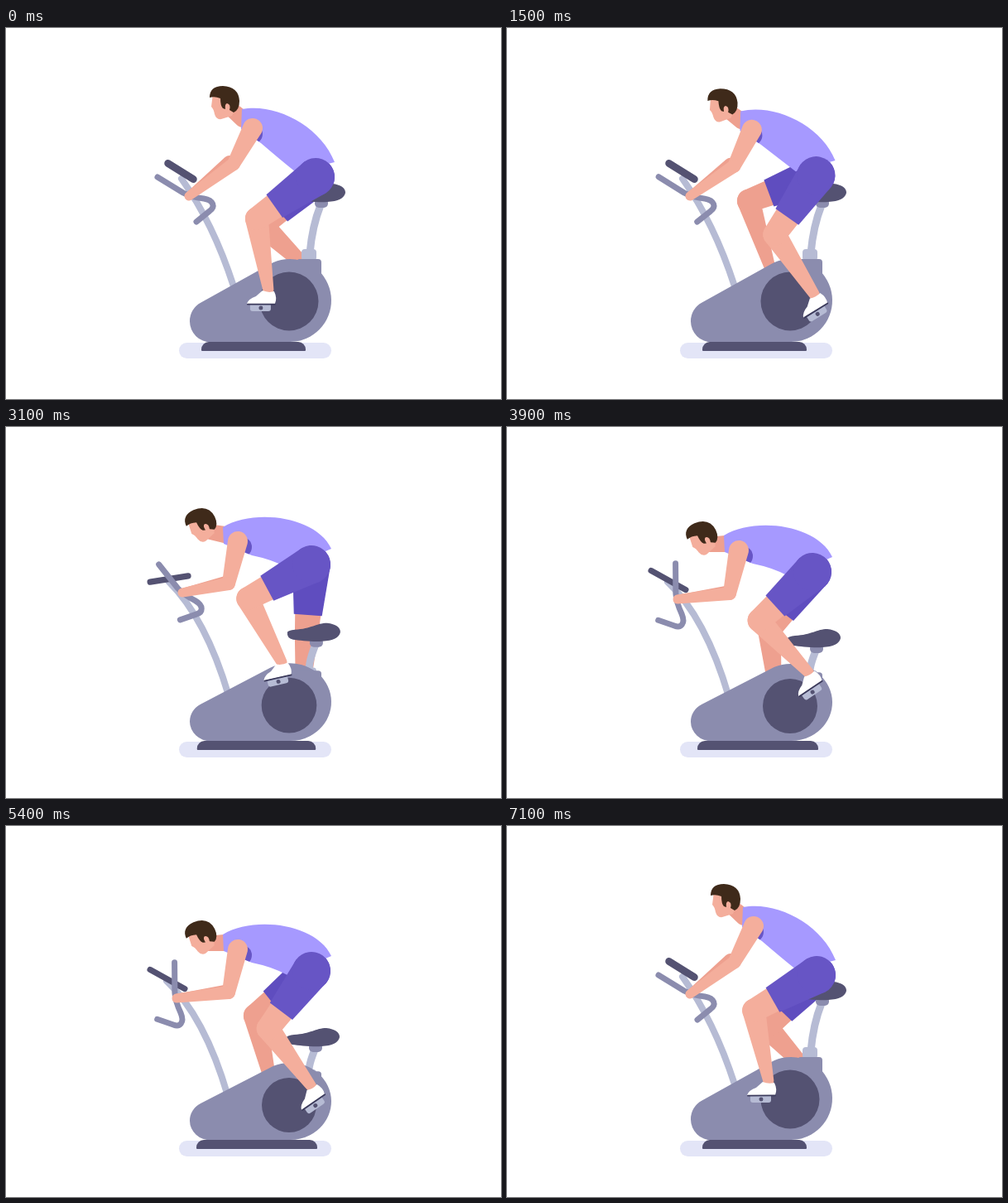
Recreate the animation shown at these times as an HTML page with a canvas. Size 598 by 448 pixels, loop 7.2 s.

```html
<!DOCTYPE html>
<html>
<head>
<meta charset="utf-8">
<title>Exercise bike</title>
<style>
html, body { margin: 0; width: 100%; height: 100%; overflow: hidden; background: #fff; }
canvas { display: block; }
</style>
</head>
<body>
<canvas id="stage" width="598" height="448"></canvas>
<script>
const ctx = document.getElementById('stage').getContext('2d');
const LOOP = 7200, STEP = 100, RAD = Math.PI / 180;
const SKIN = '#f4ae9c', SKIN_FAR = '#eea08f', SHORTS = '#6755c5', SHORTS_FAR = '#5f4dbf';
const TANK = '#a699ff', BODY = '#8b8cae', DARK = '#545272', LIGHT = '#b6bbd4', HAIR = '#3f2a1a';

// time, crank angle in degrees
const CRANK = [[0, 167], [900, 118], [2200, -128], [3100, -476], [3900, -752], [5400, -1078], [7100, -1260]];

// time, lean, bike compression, lift, bar angle, screen angle, hand x, hand y
const POSES = [
  [0, 0, 0, 0, 0, 32, 221, 203],
  [900, .1, 0, -1, 0, 32, 221, 203],
  [2200, .15, 0, -2, 1, 32, 221, 203],
  [2500, .12, .04, -7, 2, 30, 221, 203],
  [3100, 1, .87, -10, 20, -9, 213, 200],
  [3300, 1, .95, -3, 42, 14, 209, 205],
  [3600, 1, 1, 0, 58, 29, 206, 208],
  [6400, 1, 1, 0, 58, 29, 206, 208],
  [7100, 0, 0, 0, 0, 32, 221, 203],
  [7200, 0, 0, 0, 0, 32, 221, 203]
];

// upright and crouched outlines of the vest
const VEST_UP = [285, 98, 325, 90, 380, 118, 397, 162, 350, 174, 330, 158, 308, 139, 284, 122];
const VEST_LOW = [262, 131, 300, 108, 375, 118, 393, 157, 340, 180, 322, 170, 297, 165, 263, 151];

const mix = (a, b, k) => a + (b - a) * k;
const mixAll = (a, b, k) => a.map((v, i) => mix(v, b[i], k));

function poseAt(t) {
  const i = POSES.findIndex(row => row[0] > t);
  const a = POSES[i - 1], b = POSES[i];
  const u = (t - a[0]) / (b[0] - a[0]);
  return mixAll(a, b, u * u * (3 - 2 * u));
}

// periodic cubic through the crank keys, four turns per loop
function crankAt(t) {
  const n = CRANK.length;
  const key = i => {
    const turn = Math.floor(i / n), [time, angle] = CRANK[i - turn * n];
    return [time + turn * LOOP, angle - turn * 1440];
  };
  const slope = i => (key(i + 1)[1] - key(i - 1)[1]) / (key(i + 1)[0] - key(i - 1)[0]);
  let i = 0;
  while (key(i + 1)[0] <= t) i++;
  const [t0, a] = key(i), [t1, b] = key(i + 1);
  const d = t1 - t0, u = (t - t0) / d, v = 1 - u;
  return v * v * (1 + 2 * u) * a + u * u * (1 + 2 * v) * b + u * v * d * (v * slope(i) - u * slope(i + 1));
}

function fill(path, color) {
  ctx.fillStyle = color;
  ctx.fill(new Path2D(path));
}

function line(path, color, width) {
  ctx.strokeStyle = color;
  ctx.lineWidth = width;
  ctx.lineCap = ctx.lineJoin = 'round';
  ctx.stroke(new Path2D(path));
}

function disc(x, y, r, color) {
  ctx.fillStyle = color;
  ctx.beginPath();
  ctx.arc(x, y, r, 0, 7);
  ctx.fill();
}

function box(x, y, w, h, radii, color) {
  ctx.fillStyle = color;
  ctx.beginPath();
  ctx.roundRect(x, y, w, h, radii);
  ctx.fill();
}

// hull of two discs
function taper([x1, y1], r1, [x2, y2], r2, color) {
  const axis = Math.atan2(y2 - y1, x2 - x1);
  const side = Math.acos((r1 - r2) / Math.hypot(x2 - x1, y2 - y1));
  ctx.fillStyle = color;
  ctx.beginPath();
  ctx.arc(x1, y1, r1, axis + side, axis - side + 2 * Math.PI);
  ctx.arc(x2, y2, r2, axis - side, axis + side);
  ctx.fill();
}

function placed(x, y, degrees, draw) {
  ctx.save();
  ctx.translate(x, y);
  ctx.rotate(degrees * RAD);
  draw();
  ctx.restore();
}

function leg(hip, angle, low, far) {
  const reach = mix(36, 31, low), a = angle * RAD;
  const px = 342 + reach * Math.cos(a), py = mix(330, 337, low) + reach * Math.sin(a);
  const tilt = -17.5 * (1 - Math.cos((angle - 170) * RAD)), c = Math.cos(tilt * RAD), s = Math.sin(tilt * RAD);
  const ankle = [px + 10 * c + 22 * s, py + 10 * s - 22 * c];

  const dx = ankle[0] - hip[0], dy = ankle[1] - hip[1], dist = Math.hypot(dx, dy);
  const bend = Math.sqrt(Math.max(0, 87 * 87 - dist * dist / 4)) / dist;
  const knee = [hip[0] + dx / 2 - dy * bend, hip[1] + dy / 2 + dx * bend];

  const skin = far ? SKIN_FAR : SKIN, cloth = far ? SHORTS_FAR : SHORTS;
  taper(knee, 14, ankle, 6.5, skin);
  taper(hip, 19, knee, 14, skin);

  const len = Math.hypot(knee[0] - hip[0], knee[1] - hip[1]);
  placed(...hip, Math.atan2(knee[1] - hip[1], knee[0] - hip[0]) / RAD, () => {
    fill(`M0 -23 L${len * .7} -17 L${len * .7} 17 L0 23Z`, cloth);
    disc(0, 0, 23, cloth);
  });
  if (far) return;

  placed(px, py, tilt, () => {
    box(-12, -4, 25, 8, [0, 0, 3, 3], LIGHT);
    disc(1, 0, 2.5, DARK);
    fill('M-16 -5 Q-14 -11 -5 -14 L3 -21 Q10 -18 17 -20 Q21 -12 18 -5Z', '#fff');
    line('M-15 -4.5 H18', '#3c3b5c', 1.8);
  });
}

function bikeFrame(low, barTurn, screenTurn, hand) {
  const seat = [mix(383, 376, low), mix(199, 255, low)];
  const [x, y] = seat;
  line(`M${x - 3} ${y + 15} Q${x - 13} ${y + 40} ${mix(367, 367, low)} ${mix(272, 300, low)}`, LIGHT, 9);
  box(357, mix(267, 294, low), 18, 14, 4, LIGHT);
  box(x - 10, y + 7, 16, 11, 5, BODY);
  placed(x, y, 0, () => fill('M-37 0Q-36 -2 -28 -3C-8 -4 -2 -11 11 -11Q27 -9 27 0Q25 10 5 11C-5 12 -22 10 -30 9Q-38 7 -37 0', DARK));

  const post = mixAll([212, 182, 250, 235, 275, 312], [194, 187, 240, 230, 268, 326], low);
  line(`M${post[0]} ${post[1]} Q${post.slice(2)}`, LIGHT, 8);

  ctx.save();
  ctx.translate(0, 380);
  ctx.scale(1, mix(1, .93, low));
  ctx.translate(0, -380);
  taper([343, 329], 50, [247.5, 354], 25.5, BODY);
  box(350, mix(279, 290, low), 31, 22, [5, 4, 0, 0], BODY);
  ctx.restore();
  disc(342, mix(330, 337, low), mix(35.5, 33, low), DARK);

  const left = mix(236, 230, low);
  box(left, 379, mix(362, 376, low) - left, 11, [9, 9, 1, 1], DARK);

  const half = mix(18, 24, low);
  placed(mix(211, 195, low), mix(173, 185, low), screenTurn, () => line(`M${-half} 0 H${half}`, DARK, mix(9, 7, low)));
  placed(hand[0] - 2, hand[1] - 1, barTurn, () =>
    line('M-36 -22 L-5 -3 Q4 2 20 4 C32 6 34 14 27 19 L11 32', BODY, 7));
}

function head(x, y, tilt, neck) {
  taper([x + 8, y + 12], 9, neck, 10, SKIN_FAR);
  placed(x, y, tilt, () => {
    fill('M-14 -7 L-16 9 Q-13 12 -12 18 Q-10 25 -4 24 L9 20 Q15 10 12 -4Z', SKIN);
    fill('M-18 -2Q-18 -16 -2 -16Q17 -15 18 2Q18 13 11 16L6 13Q8 6 3 5Q0 6 1 12L-2 11Q-5 8 -5 -1Q-12 -4 -18 -2', HAIR);
  });
}

function render(t) {
  const [, lean, low, lift, barTurn, screenTurn, handX, handY] = poseAt(t);
  const angle = crankAt(t), hand = [handX, handY];
  const hip = [mix(374, 369, lean), mix(180, 175, lean) + lift * .9];
  const shoulder = [mix(298, 280, lean), mix(121, 149, lean) + lift * 1.1];
  const elbow = [mix(275, 269, lean), mix(164, 201, lean) + lift * 1.2];
  const neck = [mix(286, 264, lean), mix(110, 141, lean) + lift * 1.1];

  ctx.fillStyle = '#fff';
  ctx.fillRect(0, 0, 598, 448);
  box(209, 380, 184, 19, 9.5, '#e3e5f7');

  leg(hip, angle + 180, low, true);
  bikeFrame(low, barTurn, screenTurn, hand);
  head(mix(264, 235, lean), mix(86, 130, lean) + lift * 1.6, -25 * lean, neck);

  const v = mixAll(VEST_UP, VEST_LOW, lean).map((n, i) => i % 2 ? n + lift : n);
  const vest = new Path2D(`M${v.slice(0, 2)} C${v.slice(2, 8)} L${v.slice(8, 10)} Q${v.slice(10, 14)} L${v.slice(14)}Z`);
  ctx.fillStyle = TANK;
  ctx.fill(vest);
  ctx.save();
  ctx.clip(vest);
  disc(shoulder[0] + mix(0, 5, lean), shoulder[1] + 7, 12, SHORTS);
  ctx.restore();

  leg(hip, angle, low, false);

  const farElbow = [elbow[0] - 5 * (1 - lean), elbow[1] - 2];
  taper(farElbow, 8, hand, 5, SKIN_FAR);
  taper(shoulder, 12, elbow, 8, SKIN);
  taper(elbow, 8, hand, 5.5, SKIN);
}

function tick() {
  render(Math.floor(performance.now() % LOOP / STEP) * STEP);
  requestAnimationFrame(tick);
}
tick();
</script>
</body>
</html>
```
